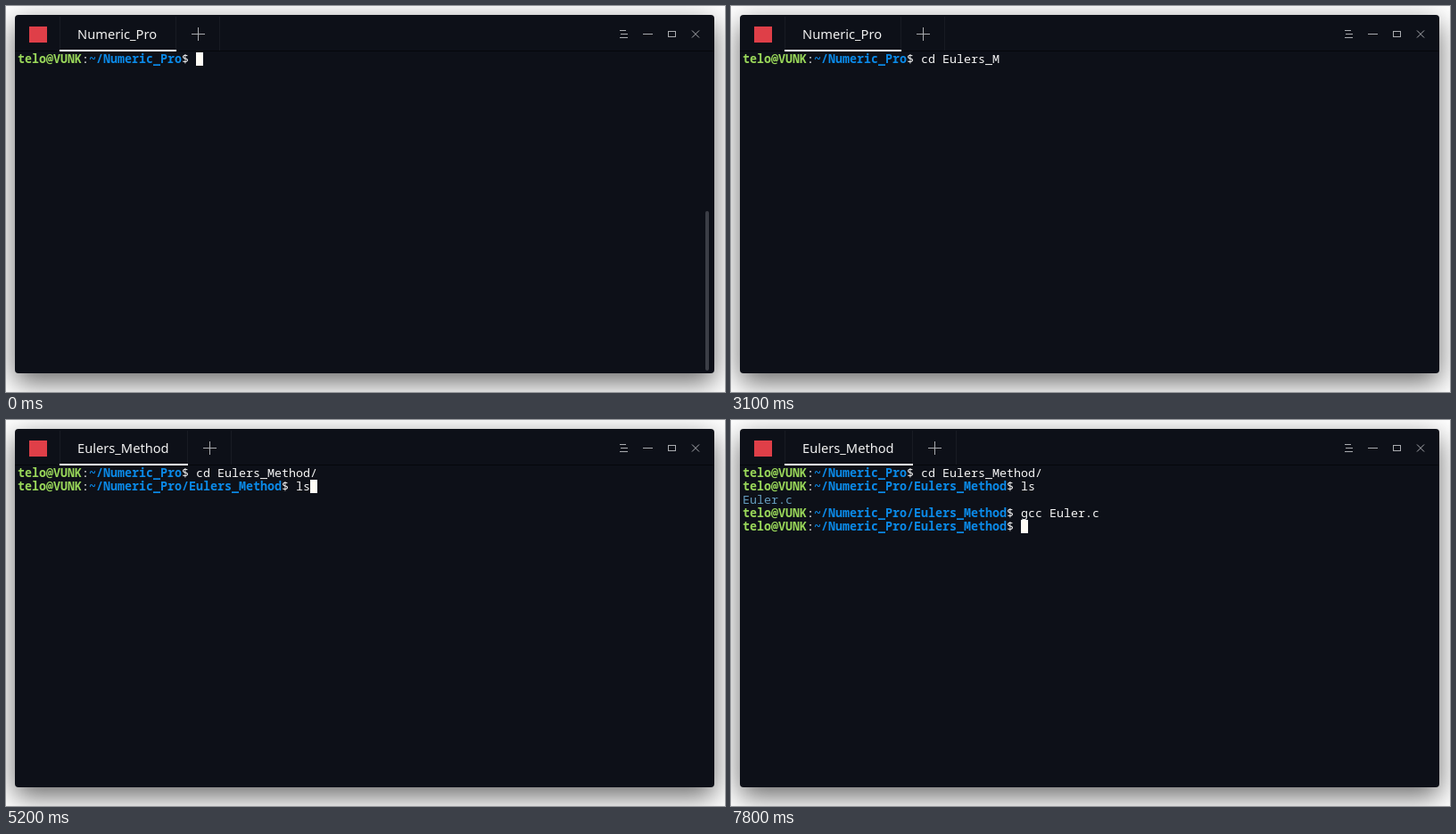
These frames come from a looping animation (806x433 px, 8 s). An HTML page:

```html
<!DOCTYPE html>
<html lang="en">
<head>
<meta charset="utf-8">
<title>Terminal session</title>
<style>
  html, body { margin: 0; width: 100%; height: 100%; overflow: hidden; background: #fff; }
  .window {
    position: absolute; left: 10px; top: 10px; width: 784px; height: 402px;
    border-radius: 4px; background: #0d1018;
    box-shadow: 0 10px 30px rgba(0, 0, 0, .6);
  }
  svg { position: absolute; left: 0; top: 0; display: block; }
  text { white-space: pre; }
  .title { font: 14.667px "Noto Sans", "Open Sans", sans-serif; fill: #f2f2f2; }
  .term { font: 13.333px "Noto Sans Mono", "Liberation Mono", monospace; fill: #f6f6f6; }
  .user { font-weight: 700; fill: #9ad85a; }
  .path { font-weight: 700; fill: #0b8ae8; }
  .file { fill: #659dbf; }
  .icon { fill: none; stroke: #a9abaf; stroke-width: 1; }
  .sep { fill: #181b23; }
</style>
</head>
<body>
<div class="window"></div>
<svg width="806" height="433" viewBox="0 0 806 433">
  <rect x="10" y="50" width="784" height="1" fill="#05070b"/>
  <rect x="26" y="23" width="20" height="18" fill="#df3f48"/>
  <rect class="sep" x="60" y="12" width="1" height="38"/>
  <rect id="line" x="60" y="49" width="131" height="2" fill="#fff"/>
  <text id="title" class="title" x="80" y="37"></text>
  <g id="tabEnd">
    <rect class="sep" x="190" y="12" width="1" height="37"/>
    <rect class="sep" x="239" y="12" width="1" height="38"/>
    <path class="icon" d="M208 31.5h15M215.5 24v15"/>
  </g>
  <g class="icon">
    <path d="M688 27.5h7M689 31.5h8M688 35.5h9"/>
    <path d="M714 31.5h11"/>
    <rect x="742.5" y="28.5" width="8" height="6"/>
    <path d="M769 27.5l8 8M777 27.5l-8 8"/>
  </g>
  <rect id="scroll" x="784" y="230" width="4" height="179" rx="2" fill="#3b3e46"/>
  <g id="term" class="term"></g>
  <rect id="cursor" width="8" height="15" fill="#fffcf5"/>
</svg>
<script>
const LOOP = 8000, LEFT = 13, TOP = 52, COL = 8, ROW = 15;
const USER = 'telo@VUNK', HOME = '~/Numeric_Pro', SUB = HOME + '/Eulers_Method';
const $ = id => document.getElementById(id);

const lines = [
  { path: HOME, cmd: 'cd Eulers_Method/' },
  { path: SUB, cmd: 'ls' },
  { out: 'Euler.c' },
  { path: SUB, cmd: 'gcc Euler.c' },
  { path: SUB, cmd: '' }
];

// [time, row, typed text (null: no prompt yet), cursor shown]
const steps = [
  [0, 0, '', 1],
  [300, 0, 'c', 1],
  [400, 0, 'cd', 1],
  [600, 0, 'cd ', 1],
  [1200, 0, 'cd ', 0],
  [1400, 0, 'cd ', 1],
  [2000, 0, 'cd ', 0],
  [2100, 0, 'cd E', 0],
  [2200, 0, 'cd E', 1],
  [2300, 0, 'cd Eu', 1],
  [2600, 0, 'cd Eulers_M', 1],
  [3100, 0, 'cd Eulers_M', 0],
  [3700, 0, 'cd Eulers_M', 1],
  [3800, 0, 'cd Eulers_Me', 1],
  [4000, 0, 'cd Eulers_Method/', 1],
  [4300, 1, '', 1],
  [4900, 1, '', 0],
  [5100, 1, 'l', 1],
  [5200, 1, 'ls', 1],
  [5500, 3, '', 1],
  [6000, 3, '', 0],
  [6300, 3, 'g', 1],
  [6500, 3, 'gc', 1],
  [6700, 3, 'gcc', 1],
  [6900, 3, 'gcc ', 1],
  [7200, 3, 'gcc Euler.c ', 1],
  [7600, 4, null, 1],
  [7800, 4, '', 1]
];

function addText(parent, col, row, str, cls) {
  const el = document.createElementNS('http://www.w3.org/2000/svg', 'text');
  el.setAttribute('x', LEFT + col * COL);
  el.setAttribute('y', TOP + 12 + row * ROW);
  if (cls) el.setAttribute('class', cls);
  el.textContent = str;
  parent.append(el);
  return el;
}

const show = (el, on) => el.setAttribute('visibility', on ? 'visible' : 'hidden');

lines.forEach((line, row) => {
  const g = document.createElementNS('http://www.w3.org/2000/svg', 'g');
  $('term').append(g);
  line.group = g;
  if (line.out) {
    addText(g, 0, row, line.out, 'file');
    return;
  }
  const colon = USER.length, end = colon + 1 + line.path.length;
  addText(g, 0, row, USER, 'user');
  addText(g, colon, row, ':');
  addText(g, colon + 1, row, line.path, 'path');
  addText(g, end, row, '$');
  line.start = end + 2;
  line.input = addText(g, line.start, row, '');
});

function setTab(name, width) {
  $('title').textContent = name;
  $('line').setAttribute('width', width);
  $('tabEnd').setAttribute('transform', `translate(${width - 131} 0)`);
}

function draw(t) {
  const [, row, typed, blink] = steps.findLast(s => s[0] <= t);
  lines.forEach((line, i) => {
    show(line.group, i < row || (i === row && typed !== null));
    if (line.input) line.input.textContent = i < row ? line.cmd : i === row ? typed || '' : '';
  });
  const col = typed === null ? 0 : lines[row].start + typed.length;
  $('cursor').setAttribute('x', LEFT + col * COL);
  $('cursor').setAttribute('y', TOP + row * ROW);
  show($('cursor'), blink);
  show($('scroll'), t < 600);
  if (t < 4400) setTab('Numeric_Pro', 131);
  else setTab('Eulers_Method', 144);
}

const began = performance.now();
function tick() {
  draw((performance.now() - began) % LOOP);
  requestAnimationFrame(tick);
}
tick();
</script>
</body>
</html>
```
